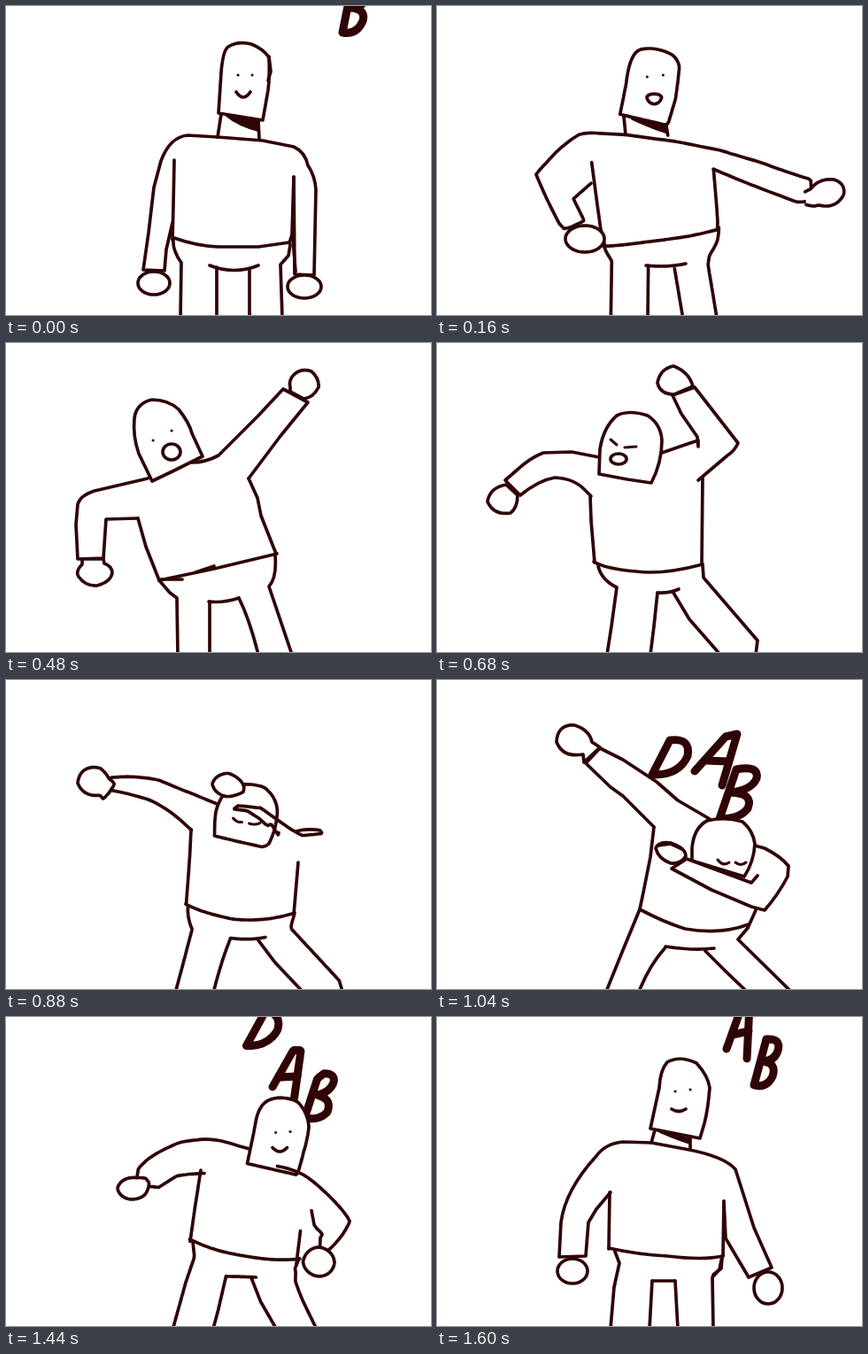
These frames come from a looping animation (480 px wide and 349 px high, 1.68 s). An HTML page:

```html
<!DOCTYPE html>
<html lang="en">
<head>
<meta charset="utf-8">
<title>Dab dance</title>
<style>
html, body { margin: 0; width: 100%; height: 100%; overflow: hidden; background: #fff; }
svg { display: block; width: 100%; height: 100%; }
path { fill: none; stroke: #2f0406; stroke-width: 3.7; stroke-linecap: round; stroke-linejoin: round; }
.solid { fill: #fff; }
.dark { fill: #2f0406; stroke-width: 2; }
.letter { stroke-width: 9; }
.eye { stroke-width: 3; }
</style>
</head>
<body>
<svg id="stage" viewBox="0 0 480 349" preserveAspectRatio="none"></svg>
<script>
const LOOP = 1680, STEPS = 20, SAMPLES = 64;
const holds = Array.from({ length: STEPS }, (_, i) => i === 6 || i === 8 ? 120 : 80);

const oval = (x, y, rx, ry, sweep = 1) =>
  `M${x - rx},${y}a${rx},${ry} 0 1 ${sweep} ${2 * rx},0a${rx},${ry} 0 1 ${sweep} ${-2 * rx},0`;
const dot = (x, y) => `M${x},${y}h.1`;
// A smile runs there and back, so that it can open into a round mouth.
const smile = (x, y, w, h) =>
  `M${x},${y}q${w / 2},${h} ${w},0q${-w / 2},${h} ${-w},0`;

// Part name and class, back to front.
const parts = {
  letterD: 'letter', letterA: 'letter', barA: 'letter', letterB: 'letter',
  neckL: '', neckR: '', shade: 'dark',
  sideL: '', sideR: '', belt: '', legL: '', legR: '', crotch: '', innerL: '', innerR: '',
  armL: '', head: 'solid', armR: '', eyeL: 'eye', eyeR: 'eye', mouth: '',
  handL: 'solid', handR: 'solid', accent: ''
};

// Key drawings. swingL and swingR bend the hand paths towards the next key;
// flipR swaps the two edges of the right arm as it folds over.
const poses = [
  {
    at: 0, swingL: [-10, 0], swingR: [32, 24],
    head: 'M240,121L243,75Q245,50 251,46Q262,39 277,43Q290,48 297,58Q298,80 296,95L290,129Z',
    eyeL: dot(262, 78), eyeR: dot(278, 78), mouth: smile(260, 97, 16, 12),
    shade: 'M249,124L286,130L285,141Q262,135 249,124Z',
    neckL: 'M243,122L239,148', neckR: 'M285,130L286,150',
    armL: 'M239,148L205,146Q185,148 175,175L167,205L161,256L155,298L179,299L181,275L188,245',
    armR: 'M239,148L290,152L325,159Q338,165 341,180Q349,192 350,207L348,304L326,303L325,193',
    sideL: 'M190,174L189,225L188,264', sideR: 'M325,193L323,258L320,268',
    belt: 'M190,262Q215,271 240,272L285,272L320,267',
    legL: 'M189,264Q188,276 198,290L197,352', legR: 'M321,270L319,282L310,292L312,352',
    crotch: 'M230,293Q258,304 285,293', innerL: 'M238,295L238,352', innerR: 'M275,298L275,352',
    handL: oval(167, 313, 18, 13), handR: oval(337, 317, 19, 13),
    letterB: 'M380,30L390,-20Q410,-21 407,-9Q403,2 388,2Q407,3 403,17Q396,33 380,30',
    accent: 'M297,57L299,74L296,84M324,262L327,300'
  },
  {
    at: 3, swingL: [-10, 5], swingR: [15, -10],
    head: 'M190,123L199,90Q204,55 218,51Q235,49 256,59Q264,68 261,80L256,110L246,138Z',
    eyeL: dot(225, 81), eyeR: dot(244, 78), mouth: oval(234, 106, 8.5, 8.5, 0),
    shade: 'M205,129L246,138L248,145Z',
    neckL: 'M195,126L200,144', neckR: 'M246,138L248,144',
    armL: 'M200,144L165,142L152,142L125,159L97,180L118,206L140,231L148,235L171,215L144,191L167,178',
    armR: 'M200,144L245,142L300,144L345,135L419,122L425,153L345,172L306,180',
    sideL: 'M167,178L176,222L183,256L191,276', sideR: 'M306,180L312,220L315,245',
    belt: 'M191,276L235,264Q290,254 316,245',
    legL: 'M183,258L190,275L197,287L196,352', legR: 'M317,240Q318,260 306,277L304,287L318,352',
    crotch: 'M239,293L279,290', innerL: 'M239,293L238,352', innerR: 'M265,296L279,352',
    handL: oval(180, 238, 24, 16),
    handR: 'M423,125L431,124Q440,110 457,110Q471,113 470,127Q464,143 448,143Q440,141 437,145L425,147',
    accent: 'M146,192L157,187M248,295L279,290M205,142L246,144M317,241L315,256M306,276L312,270M197,292L198,349'
  },
  {
    at: 6, swingL: [-14, 0], swingR: [0, -6],
    head: 'M165,156L150,125Q143,105 145,85Q147,68 165,64Q183,64 195,75Q207,90 210,102L222,128L190,144Z',
    eyeL: dot(166, 110), eyeR: dot(187, 99), mouth: oval(187, 123, 10, 9, 0),
    armL: 'M160,153L100,167Q84,172 81,182L79,205L81,244L110,243L113,199L149,198',
    armR: 'M210,135Q225,135 240,127L285,82L313,52L341,67L310,105L274,153',
    sideL: 'M149,198L158,230L173,268', sideR: 'M274,153L284,175L288,195L305,238',
    belt: 'M173,268L235,255L306,238',
    legL: 'M173,268L185,282L193,288L194,352', legR: 'M304,240Q306,265 297,275L323,352',
    crotch: 'M229,292Q245,294 263,288', innerL: 'M230,292L230,352', innerR: 'M263,288Q275,312 285,352',
    handL: 'M82,264Q78,258 86,250L86,244L110,244L111,249Q120,252 120,260Q118,270 103,274Q90,275 82,264',
    handR: 'M321,50Q319,42 325,36Q333,28 345,32Q354,40 353,50Q347,62 336,63L321,55Z',
    accent: 'M175,267L199,267M214,259L235,252'
  },
  {
    at: 8, swingL: [-15, -8], swingR: [-15, 0], flipR: true,
    head: 'M183,148L184,120Q188,95 203,82Q217,75 238,82Q253,92 254,110Q254,135 242,158L215,154Z',
    eyeL: 'M196,109L203,115', eyeR: 'M212,118L225,117', mouth: oval(205, 131, 9, 6, 0),
    armL: 'M183,129L152,123L120,124Q105,130 92,142L77,155L94,172Q115,155 133,152Q155,153 167,166L174,173',
    armR: 'M254,124L280,115L295,110L295,117L294,106L276,80L266,59L291,50L340,113Q336,122 328,127L295,155',
    sideL: 'M173,172L174,200L178,248', sideR: 'M300,152L299,250',
    belt: 'M177,247Q190,255 225,258Q255,262 300,250',
    legL: 'M182,252Q186,268 203,276L197,320L192,352', legR: 'M300,250L301,265L362,336L360,352',
    crotch: 'M249,282Q262,283 273,278', innerL: 'M249,282L245,320L241,352', innerR: 'M267,282L285,312L320,352',
    handL: 'M57,179Q60,163 78,160L91,172Q91,186 83,192Q64,195 57,179Z',
    handR: 'M249,45Q252,29 267,26Q285,33 289,49L268,58Q252,58 249,45Z'
  },
  {
    at: 12, swingL: [0, 0], swingR: [0, 0],
    head: 'M288,204L288,190Q290,167 305,159Q325,154 345,160Q357,170 359,185Q358,205 347,222Z',
    eyeL: 'M317,203Q323,211 330,206', eyeR: 'M337,206Q343,211 349,206',
    armL: 'M308,157L272,136L248,115L210,90L184,77L168,94L196,121L210,131L245,166',
    armR: 'M359,187L370,190Q388,199 397,210L396,222Q385,243 370,260L355,256L310,237L265,213L282,202L355,229L362,221',
    sideL: 'M245,166L241,200L233,240L229,259', sideR: 'M360,260L351,280',
    belt: 'M229,259Q255,273 280,281Q320,288 352,276',
    legL: 'M229,259L210,305L191,352', legR: 'M351,280L340,293L400,352',
    crotch: 'M258,301Q290,306 313,303', innerL: 'M258,302Q240,322 228,352', innerR: 'M303,306L325,328L350,352',
    handL: 'M135,70Q136,50 155,51Q172,56 175,70L184,76L166,93L165,84Q142,88 135,70Z',
    handR: 'M247,190Q250,182 264,184Q281,190 281,199Q276,208 264,207Q250,202 247,190Z',
    letterD: 'M243,107L263,68Q287,65 283,86Q273,108 243,107Z',
    letterA: 'M291,103L326,64L339,61L322,119', barA: 'M304,91L329,92',
    letterB: 'M319,157L338,101Q364,96 361,111Q356,124 332,127Q358,128 351,145Q342,157 319,157',
    accent: 'M250,187L264,185L277,191'
  },
  {
    at: 15, swingL: [-20, 0], swingR: [25, 5],
    head: 'M304,205L311,170Q313,148 325,140Q345,131 365,139Q377,150 376,170Q373,185 368,195L361,220Z',
    eyeL: dot(340, 177), eyeR: dot(356, 177), mouth: smile(337, 191, 17, 13),
    armL: 'M314,158L290,135L262,107L245,103L199,90L190,109L232,124L245,143L252,155',
    armR: 'M371,195Q385,197 393,208Q397,215 397,235L399,281L365,275L330,264L298,251L302,229L340,237L376,249L364,246L366,229',
    sideL: 'M245,148L232,200L222,245', sideR: 'M341,275L333,287',
    belt: 'M221,241Q240,257 260,264Q300,278 341,276',
    legL: 'M221,243L219,265L195,320L181,352', legR: 'M340,276L333,287Q345,309 360,325L389,352',
    crotch: 'M254,288Q270,288 296,290', innerL: 'M254,288L238,330L228,352', innerR: 'M285,291L305,320L335,346',
    handL: 'M156,99Q163,88 180,90L190,87L194,92L188,105Q178,113 166,110Q157,106 156,99Z',
    handR: 'M263,237Q268,223 283,222Q300,226 302,238Q300,250 285,252Q266,250 263,237Z',
    letterD: 'M253,83L275,44Q293,49 287,66Q276,84 253,83Z',
    letterA: 'M275,122L304,89L313,89L301,137', barA: 'M285,116L306,118',
    letterB: 'M317,150L334,104Q359,99 356,112Q351,124 331,126Q354,130 347,148Q337,155 317,150',
    accent: 'M212,285L184,349M251,292L232,349M180,91L188,98'
  },
  {
    at: 19, swingL: [0, 0], swingR: [0, 0],
    head: 'M241,126L251,80Q252,60 260,51Q274,43 293,52Q306,66 308,80Q306,105 302,120L297,137Z',
    eyeL: dot(269, 84), eyeR: dot(286, 82), mouth: smile(265, 104, 16, 5),
    shade: 'M246,127L286,138L286,143Q262,135 246,127Z',
    neckL: 'M246,128L242,142', neckR: 'M286,137L286,150',
    armL: 'M242,142L210,141Q190,143 180,157Q145,195 140,232L138,271L168,270L171,232L180,217L196,198',
    armR: 'M242,142L285,150Q325,158 337,172L345,197L358,238L378,283L352,294L326,250L324,208',
    sideL: 'M195,198L194,262', sideR: 'M324,208L323,270',
    belt: 'M194,261Q225,268 260,270Q300,275 323,270',
    legL: 'M201,265L206,278L200,305L196,352', legR: 'M322,270L319,285L311,294L312,352',
    crotch: 'M243,298L269,298', innerL: 'M243,298L240,352', innerR: 'M269,298L272,352',
    handL: oval(153, 287, 17, 14), handR: oval(374, 306, 16, 18),
    letterD: 'M290,-18L312,-59Q331,-54 326,-36Q315,-17 290,-18Z',
    letterA: 'M327,36L345,-14L353,-14L350,47', barA: 'M334,20L352,16',
    letterB: 'M358,77L372,25Q389,24 385,38Q381,50 368,50Q384,52 379,67Q372,81 358,77',
    accent: 'M312,291L321,284L322,272'
  }
];

const NS = 'http://www.w3.org/2000/svg';
const stage = document.getElementById('stage');
const els = {};
for (const name in parts) {
  els[name] = document.createElementNS(NS, 'path');
  els[name].setAttribute('class', parts[name]);
  stage.append(els[name]);
}

function sample(d) {
  const p = document.createElementNS(NS, 'path');
  p.setAttribute('d', d);
  const len = p.getTotalLength();
  return Array.from({ length: SAMPLES + 1 }, (_, i) => p.getPointAtLength(len * i / SAMPLES));
}

function blend(name, a, b, u) {
  if (!a[name] || !b[name] || name === 'accent') return '';
  const from = sample(a[name]), to = sample(b[name]);
  if (name === 'armR' && a.flipR) to.reverse();
  const limb = /^(arm|hand)([LR])$/.exec(name);
  const [sx, sy] = limb ? a['swing' + limb[2]] : [0, 0];
  const bend = Math.sin(Math.PI * u);
  return 'M' + from.map((p, i) => {
    const q = to[i];
    const w = limb && limb[1] === 'arm' ? bend * Math.sin(Math.PI * i / SAMPLES) : bend;
    const x = p.x + (q.x - p.x) * u + sx * w;
    const y = p.y + (q.y - p.y) * u + sy * w;
    return x.toFixed(1) + ',' + y.toFixed(1);
  }).join('L');
}

// One set of paths per step, held like hand-made cels.
const cels = holds.map((_, step) => {
  const k = poses.findLastIndex(p => p.at <= step);
  const a = poses[k], b = poses[(k + 1) % poses.length];
  const u = (step - a.at) / ((b.at || STEPS) - a.at);
  const cel = {};
  for (const name in parts) cel[name] = u ? blend(name, a, b, u) : a[name] || '';
  return cel;
});

let shown = -1;
function render(now) {
  let t = now % LOOP, step = 0;
  while (step < STEPS - 1 && t >= holds[step]) t -= holds[step++];
  if (step === shown) return;
  shown = step;
  for (const name in parts) els[name].setAttribute('d', cels[step][name]);
}

function tick(now) {
  render(now);
  requestAnimationFrame(tick);
}
render(0);
requestAnimationFrame(tick);
</script>
</body>
</html>
```
